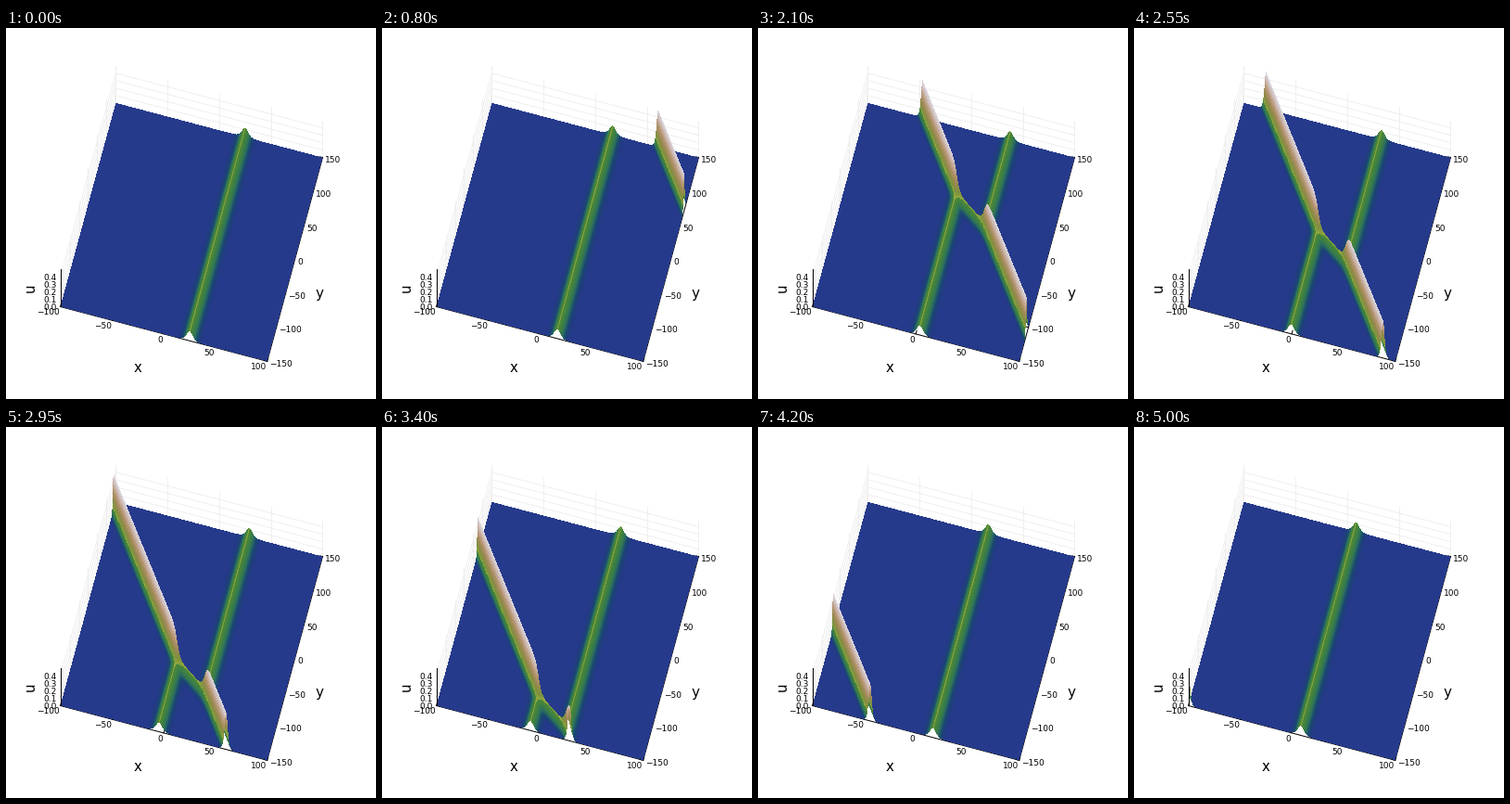
Animation, 399 px wide and 400 px high, one loop 5050 ms. Source, as a matplotlib script:

```python
import numpy as np
import matplotlib.pyplot as plt
from matplotlib.animation import FuncAnimation
from matplotlib.colors import LinearSegmentedColormap

W, H, DPI = 399, 400, 100
FRAMES, STEP_MS = 101, 50
LOG_A = -16.85                          # phase shift of the crossing waves

# Orthographic camera on a cube whose diagonal spans the stage
AZIM, ELEV = np.radians(15), np.radians(80)
SIDE = 400 / np.sqrt(3)
CENTRE = np.array([200.0, 200.0])
Z_MAX = 0.5
EX = SIDE / 200 * np.array([np.cos(AZIM), np.sin(AZIM) * np.sin(ELEV)])
EY = SIDE / 300 * np.array([np.sin(AZIM), -np.cos(AZIM) * np.sin(ELEV)])
Z_SCALE = SIDE * np.cos(ELEV) / Z_MAX
FLOOR = CENTRE + [0, Z_SCALE * Z_MAX / 2]

STOPS = [(0, '#263a8c'), (0.012, '#1f3f7c'), (0.03, '#1a4a70'),
         (0.055, '#246066'), (0.09, '#30745a'), (0.14, '#3a7d48'),
         (0.2, '#44843c'), (0.243, '#4c883a'), (0.25, '#93a83e'),
         (0.34, '#7d923f'), (0.5, '#98894f'), (0.68, '#b5946f'),
         (0.84, '#c9b3a8'), (1, '#dcd6de')]
CMAP = LinearSegmentedColormap.from_list('relief', STOPS, N=512)


def project(x, y, u=0.0):
    p = FLOOR + x * EX + y * EY
    return p[0], p[1] - Z_SCALE * u


def height(x, y, t):
    """Two-soliton wave: u = 2 (log tau)_xx as a variance of wave numbers."""
    a = 0.5 * x + 0.125 * t
    b = x + 0.5 * y + 1.75 * t
    terms = [(0.0, np.zeros_like(x)), (0.5, a), (1.0, b), (1.5, a + b + LOG_A)]
    top = np.maximum.reduce([e for _, e in terms])
    s0 = s1 = s2 = 0
    for k, e in terms:
        w = np.exp(e - top)
        s0, s1, s2 = s0 + w, s1 + k * w, s2 + k * k * w
    return 2 * (s2 / s0 - (s1 / s0) ** 2)


# Screen columns crossing the floor, each sampled from its front to its back
left, right = project(-100, -150), project(100, -150)
back_l, back_r = project(-100, 150), project(100, 150)
cols = np.arange(int(np.ceil(left[0] - 0.5)), int(back_r[0] - 0.5) + 1)
cx = cols + 0.5
front = np.interp(cx, [left[0], right[0], back_r[0]],
                  [left[1], right[1], back_r[1]])
back = np.interp(cx, [left[0], back_l[0], back_r[0]],
                 [left[1], back_l[1], back_r[1]])
depth = np.linspace(0, 1, 420)
floor = front[:, None] + (back - front)[:, None] * depth
inv = np.linalg.inv(np.column_stack([EX, EY]))
dx, dy = cx[:, None] - FLOOR[0], floor - FLOOR[1]
gx = inv[0, 0] * dx + inv[0, 1] * dy
gy = inv[1, 0] * dx + inv[1, 1] * dy
rows = np.arange(H) + 0.5


def render(i):
    u = height(gx, gy, 2 * i - 100.0)
    s = floor - Z_SCALE * u
    low = np.minimum.accumulate(s, axis=1)
    high = np.maximum.accumulate(s, axis=1)
    level = np.full((H, len(cols)), np.nan)
    for j in range(len(cols)):
        edge = s[j, 0]
        over = (rows <= edge) & (rows >= low[j, -1])
        under = (rows > edge) & (rows <= high[j, -1])
        for mask, path, sign in ((over, low[j], -1), (under, high[j], 1)):
            if mask.any():
                hit = np.searchsorted(sign * path, sign * rows[mask])
                level[mask, j] = u[j, np.minimum(hit, len(depth) - 1)]
    seen = ~np.isnan(level)
    img = np.zeros((H, W, 4), np.uint8)
    img[:, cols] = CMAP(np.nan_to_num(level) / Z_MAX, bytes=True)
    img[:, cols, 3] = 255 * seen
    return img


fig = plt.figure(figsize=(W / DPI, H / DPI), dpi=DPI, facecolor='white')
ax = fig.add_axes([0, 0, 1, 1])
ax.set_xlim(0, W)
ax.set_ylim(H, 0)
ax.axis('off')


def px(n):
    return n * 72 / DPI


def line(p, q, color='black', width=1.0, z=2):
    ax.plot([p[0], q[0]], [p[1], q[1]], color=color, lw=px(width), zorder=z)


def label(x, y, text, size=9.0, **kw):
    ax.text(x, y, text, fontsize=px(size), family='DejaVu Sans', zorder=5, **kw)


def draw_axes():
    grid = dict(color='#ececec', width=0.8, z=1)
    for x in range(-100, 101, 50):
        line(project(x, 150), project(x, 150, Z_MAX), **grid)
    for y in range(-150, 151, 50):
        line(project(-100, y), project(-100, y, Z_MAX), **grid)
    for n in range(5):
        u = n / 10
        line(project(-100, 150, u), project(100, 150, u), **grid)
        line(project(-100, -150, u), project(-100, 150, u), **grid)
        label(54.5, left[1] - Z_SCALE * u, f'{u:.1f}', ha='right',
              va='center_baseline')

    line(left, right)
    line(right, back_r)
    line(left, project(-100, -150, Z_MAX), z=4)
    for x in range(-100, 101, 50):
        p = project(x, -150)
        line(p, project(x, -145))
        label(p[0] - 0.8, p[1] + 5.2, str(x).replace('-', '\u2212'),
              ha='right', va='center_baseline')
    for y in range(-150, 151, 50):
        p = project(100, y)
        line(p, project(97, y))
        label(p[0] + 2.5, p[1] + 2.2, str(y).replace('-', '\u2212'),
              ha='left', va='center_baseline')

    label(142, 371, 'x', 15, ha='center', va='baseline')
    label(338, 291, 'y', 15, ha='center', va='baseline')
    label(33.5, 280.5, 'u', 15, ha='right', va='center', rotation=90)


draw_axes()
surface = ax.imshow(render(0), extent=(0, W, H, 0), interpolation='nearest',
                    aspect='auto', zorder=3)


def update(i):
    surface.set_data(render(i))
    return [surface]


anim = FuncAnimation(fig, update, frames=FRAMES, interval=STEP_MS,
                     repeat=True, repeat_delay=0, blit=False)
plt.show()
```
